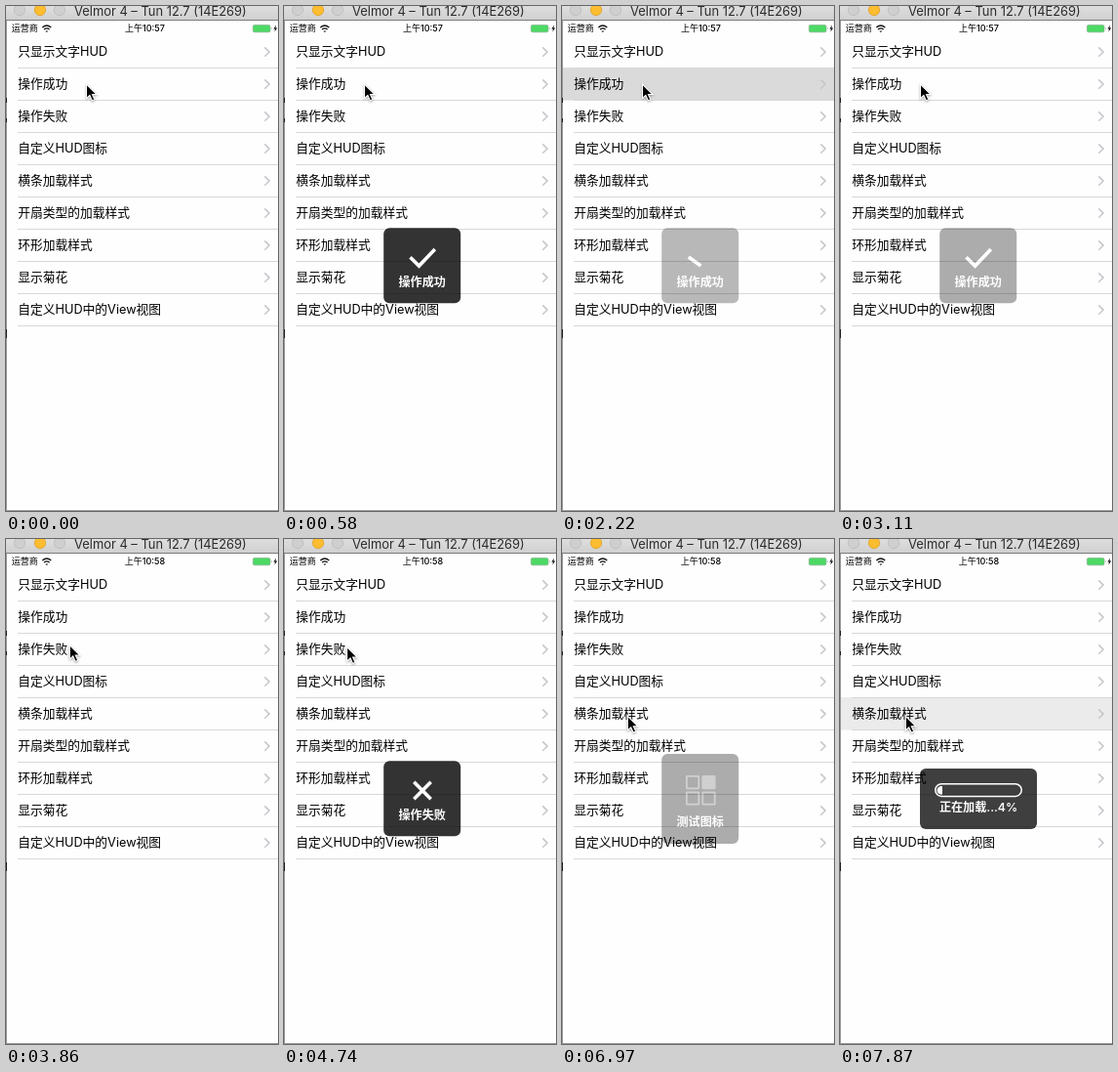
These frames come from a looping animation (279 by 517 pixels, 8 s). An HTML page:

```html
<!DOCTYPE html>
<html lang="zh-CN">
<head>
<meta charset="utf-8">
<title>HUD</title>
<style>
html, body { margin: 0; width: 100%; height: 100%; overflow: hidden; background: #fff; }
svg { display: block; width: 279px; height: 517px; font-family: Inter, "Noto Sans CJK SC", "Noto Sans CJK", sans-serif; }
.row { font-size: 12.75px; }
.status { font-size: 9px; }
.label { font-size: 12.1px; font-weight: 600; fill: #fff; text-anchor: middle; }
.line { fill: none; stroke: #fff; stroke-width: 3.6; }
</style>
</head>
<body>
<svg viewBox="0 0 279 517">
  <defs>
    <linearGradient id="bar" x1="0" y1="0" x2="0" y2="1">
      <stop offset="0" stop-color="#dedede"/><stop offset="1" stop-color="#d0d0d0"/>
    </linearGradient>
  </defs>
  <rect width="279" height="517" fill="#fefefe"/>

  <rect width="279" height="14" fill="url(#bar)"/>
  <rect y="14" width="279" height="1" fill="#7c7c7c"/>
  <g stroke-width=".8">
    <circle cx="14" cy="4" r="5.7" fill="#cfcfcf" stroke="#bcbcbc"/>
    <circle cx="35" cy="4" r="5.7" fill="#fdbd30" stroke="#e0a028"/>
    <circle cx="55" cy="4" r="5.7" fill="#cfcfcf" stroke="#bcbcbc"/>
  </g>
  <text x="70" y="9.8" font-size="12.9" fill="#2c2c2c">Velmor 4 – Tun 12.7 (14E269)</text>

  <g class="status">
    <text x="5.8" y="26.4">运营商</text>
    <text id="clock" x="142.5" y="26.4" font-weight="500" text-anchor="middle"></text>
  </g>
  <g fill="none" stroke="#111" stroke-width="1.3">
    <path d="M37.3 21.9q4.5 -3.8 9 0M39 24q2.8 -2.3 5.6 0"/>
    <path d="M40.3 25.4h3l-1.5 1.6z" fill="#111" stroke="none"/>
  </g>
  <rect x="253.4" y="19.4" width="17.6" height="7.4" rx="1.6" fill="#4cd964" stroke="#86ae8f" stroke-width=".7"/>
  <path d="M272.2 21.6q1.4 1.5 0 3z" fill="#86ae8f"/>
  <path d="M277 19.6l-2.6 3.8h1.6l-.6 3.2 2.8-4h-1.7z" fill="#111"/>

  <rect id="highlight" x="1" width="278" height="33.6" fill="#dadada"/>
  <g id="rows"></g>

  <g id="success" class="hud">
    <rect x="102.2" y="227.3" width="79" height="77" rx="6" fill-opacity=".8"/>
    <path id="tick" class="line"/>
    <text class="label" x="141.7" y="286.8">操作成功</text>
  </g>
  <g id="failure" class="hud">
    <rect x="102.2" y="227.3" width="79" height="77" rx="6" fill-opacity=".8"/>
    <path id="cross" class="line"/>
    <text class="label" x="141.7" y="286.8">操作失败</text>
  </g>
  <g id="custom" class="hud">
    <rect x="102.2" y="220" width="79" height="92" rx="6" fill-opacity=".8"/>
    <g id="tiles" stroke="#8c8c8c" stroke-width="1.8"></g>
    <text class="label" x="141.7" y="294">测试图标</text>
  </g>
  <g id="progress" class="hud">
    <rect x="82" y="235" width="120" height="62" rx="6" fill-opacity=".8"/>
    <rect x="97.8" y="250.8" width="88.4" height="12.6" rx="6.3" fill="none" stroke="#fff" stroke-width="1.5"/>
    <path id="fill" fill="#fff"/>
    <text id="percent" class="label" x="142" y="279"></text>
  </g>

  <path d="M.5 15V517M0 516.5H279" fill="none" stroke="#9c9c9c"/>
  <path d="M.5 94v5M.5 115v4M.5 331v9" stroke="#222"/>

  <path id="cursor" d="M0 0V14.6l3.4-3.1 2.5 5.4 2.5-1.1-2.4-5.3h4.6z"
    stroke="#fff" stroke-width="1.1" style="filter:drop-shadow(0 1px .8px rgba(0,0,0,.35))"/>
</svg>

<script>
const LOOP = 8000, BEAT = 148.4, OFFSET = 16, ROW = 33, TOP = 30;
const $ = id => document.getElementById(id);
const set = (id, attrs) => {
  for (const key in attrs) $(id).setAttribute(key, attrs[key]);
};

const titles = ['只显示文字HUD', '操作成功', '操作失败', '自定义HUD图标', '横条加载样式',
  '开扇类型的加载样式', '环形加载样式', '显示菊花', '自定义HUD中的View视图'];
$('rows').innerHTML = titles.map((title, i) => {
  const y = TOP + i * ROW;
  return `<text class="row" x="12.2" y="${y + 21.4}">${title}</text>
    <path d="M265.3 ${y + 12.4}l4.8 4.7-4.8 4.7" fill="none" stroke="#c7c7cc" stroke-width="1.5"/>
    <path d="M12 ${y + 33.5}H279" stroke="#d8d8da"/>`;
}).join('');

// Three hollow tiles and a solid one at the top right.
$('tiles').innerHTML = [0, 1, 2, 3].map(i =>
  `<rect x="${127.9 + (i % 2) * 16.4}" y="${242.9 + (i >> 1) * 16.4}" width="12.4" height="12.4"
    rx=".5" fill="${i === 1 ? '#8c8c8c' : 'none'}"/>`).join('');

// Times below are counted in beats of the screen refresh.
const taps = [
  { at: 2, out: 9, row: 1, hud: 'success' },
  { at: 15, out: 21, row: 1, hud: 'success' },
  { at: 27, out: 34, row: 2, hud: 'failure' },
  { at: 40, out: 47, row: 3, hud: 'custom' },
  { at: 52, out: 99, row: 4, hud: 'progress' }
];
const path = [
  [22, 82.5, 80], [26, 65.3, 108.5], [31, 65.3, 108.5], [32, 64.6, 110.5],
  [38, 55.8, 147.3], [43, 55.8, 147.3], [44, 67.3, 181.3]
];

function cursorAt(beat) {
  const next = path.findIndex(p => p[0] > beat);
  if (next === 0) return path[0].slice(1);
  if (next < 0) return path[path.length - 1].slice(1);
  const [a, b] = [path[next - 1], path[next]];
  const k = (beat - a[0]) / (b[0] - a[0]);
  const eased = k * k * (3 - 2 * k);
  return [1, 2].map(i => a[i] + (b[i] - a[i]) * eased);
}

function render(time) {
  const beat = Math.floor((time + OFFSET) / BEAT);
  const tap = taps.find(t => beat >= t.at && beat <= t.out);
  const age = tap ? beat - tap.at : 0;

  for (const hud of document.querySelectorAll('.hud')) {
    const shown = tap && tap.hud === hud.id;
    hud.setAttribute('opacity', !shown ? 0 : beat === tap.out ? 0.4 : [0.34, 0.94][age] ?? 1);
  }
  set('highlight', {
    y: TOP + (tap ? tap.row : 0) * ROW,
    opacity: tap ? [1, 0.5][age] ?? 0 : 0
  });

  set('tick', { d: age ? 'M129.5 257.3l9 8.8 16.3-17' : 'M129.8 257l12.6 9' });
  set('cross', { d: age ? 'M133.3 248.8l17.4 17.4m0-17.4l-17.4 17.4' : 'M133.3 248.8l11 11' });

  const percent = tap ? age * 4 : 0;
  set('fill', { d: percent ? `M${101 + percent} 253v8.4h-2q-3.4-1-3.4-4.2t3.4-4.2z` : '' });
  $('percent').textContent = `正在加载...${percent}%`;

  $('clock').textContent = beat < 24 ? '上午10:57' : '上午10:58';
  set('cursor', { transform: `translate(${cursorAt(beat)})` });
}

const start = performance.now();
function tick() {
  render((performance.now() - start) % LOOP);
  requestAnimationFrame(tick);
}
tick();
</script>
</body>
</html>
```
